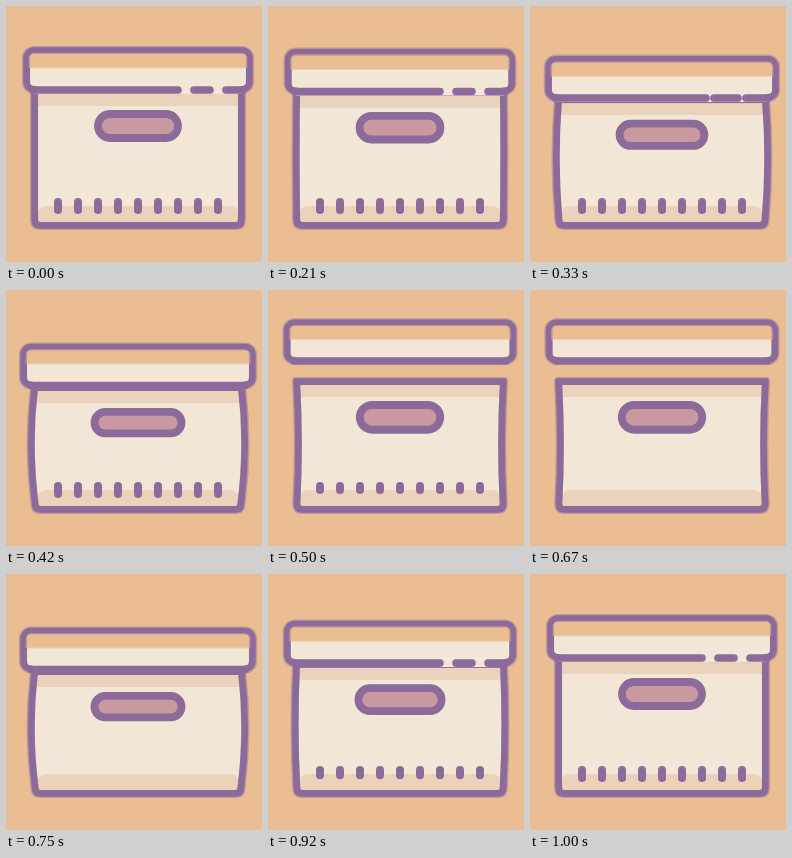
These frames come from a looping animation (256x256 px, 1210 ms). An HTML page with a canvas:

```html
<!DOCTYPE html>
<html lang="en">
<head>
<meta charset="utf-8">
<title>Storage box</title>
<style>
  html, body { margin: 0; width: 100%; height: 100%; overflow: hidden; background: #eabd93; }
  canvas { display: block; width: 256px; height: 256px; }
</style>
</head>
<body>
<canvas id="stage" width="256" height="256"></canvas>
<script>
const ctx = document.getElementById('stage').getContext('2d');
const LOOP = 1210, FPS = 24, AXIS = 132;
const ORANGE = '#eabd93', PURPLE = '#8c6a9a', CREAM = '#f2e7d7', SHADE = '#ead2bb', PINK = '#c899a0';

const rest   = { lidTop: 44, lidBase: 84, lidX: 20, boxTop: 84, bend: 28, foot: 28, gripY: 120, gripW: 80, gripH: 24 };
const squash = { lidTop: 56.5, lidBase: 95.5, lidX: 17, boxTop: 97, bend: 21, foot: 28.5, gripY: 132.7, gripW: 87, gripH: 21.5 };
const open   = { lidTop: 8, lidBase: 46.5, lidX: 20, boxTop: 85, bend: 42, foot: 28, gripY: 122, gripW: 74, gripH: 28 };

const clamp = x => Math.min(1, Math.max(0, x));
const ramp = (f, a, b) => clamp((f - a) / (b - a));
const smooth = x => x * x * (3 - 2 * x);
const soft = x => x + 0.4 * (smooth(x) - x);
const mirror = x => 2 * AXIS - x;

function mix(a, b, k) {
  const out = {};
  for (const key in a) out[key] = a[key] + (b[key] - a[key]) * k;
  return out;
}

function poseAt(f) {
  if (f < 10) return mix(rest, squash, soft(ramp(f, 4, 10)));
  if (f < 14) return mix(squash, open, smooth(ramp(f, 10, 14)));
  if (f < 18) return mix(open, squash, smooth(ramp(f, 14, 18)));
  return mix(squash, rest, ramp(f, 19, 24) ** 1.15);
}

function line(path, width, color = PURPLE, cap = 'round') {
  ctx.lineWidth = width;
  ctx.strokeStyle = color;
  ctx.lineCap = cap;
  ctx.stroke(path);
}

// Soft rim towards the backdrop, full weight inside the cream area
function outline(path, cream) {
  ctx.globalAlpha = 0.45;
  line(path, 8.2);
  ctx.globalAlpha = 1;
  line(path, 5.4);
  ctx.save();
  ctx.clip(cream);
  line(path, 8);
  ctx.restore();
}

function segment(x1, y1, x2, y2) {
  const p = new Path2D();
  p.moveTo(x1, y1);
  p.lineTo(x2, y2);
  return p;
}

function rounded(x, y, w, h, r) {
  const p = new Path2D();
  p.roundRect(x, y, w, h, r);
  return p;
}

function drawBox(p) {
  const body = new Path2D(), mid = (p.boxTop + 214) / 2;
  body.moveTo(28, p.boxTop);
  body.quadraticCurveTo(p.bend, mid, p.foot, 214);
  body.quadraticCurveTo(p.foot, 220, p.foot + 6, 220);
  body.lineTo(mirror(p.foot + 6), 220);
  body.quadraticCurveTo(mirror(p.foot), 220, mirror(p.foot), 214);
  body.quadraticCurveTo(mirror(p.bend), mid, mirror(28), p.boxTop);
  body.closePath();

  ctx.fillStyle = CREAM;
  ctx.fill(body);
  ctx.save();
  ctx.clip(body);
  ctx.fillStyle = SHADE;
  ctx.fillRect(0, p.boxTop, 256, 16);
  ctx.fill(rounded(30, 200, 204, 30, 10));
  ctx.restore();
  outline(body, body);

  const grip = rounded(AXIS - p.gripW / 2, p.gripY - p.gripH / 2, p.gripW, p.gripH, p.gripH / 2);
  ctx.fillStyle = PINK;
  ctx.fill(grip);
  line(grip, 7.8);
}

function drawTicks(f) {
  if (f > 14 && f < 20) return;
  const length = f <= 14 ? 1 - smooth(ramp(f, 10, 14)) : ramp(f, 20, 23);
  for (let x = 52; x <= 212; x += 20) line(segment(x, 196, x, 196.1 + 7.9 * length), 8);
}

function drawLid(p, gap) {
  const left = p.lidX, right = mirror(left), top = p.lidTop, base = p.lidBase;
  const split = top + 0.45 * (base - top);
  const fill = ctx.createLinearGradient(0, split - 1, 0, split + 1);
  fill.addColorStop(0, ORANGE);
  fill.addColorStop(1, CREAM);
  ctx.fillStyle = fill;
  ctx.fill(rounded(left, top, right - left, base - top, 8));
  if (gap > 0) line(segment(left + 8, base, right - 8, base), 8, CREAM, 'butt');

  const rim = new Path2D();
  rim.moveTo(left + 8, base);
  rim.arcTo(left, base, left, top, 8);
  rim.arcTo(left, top, right, top, 8);
  rim.arcTo(right, top, right, base, 8);
  rim.arcTo(right, base, left, base, 8);
  outline(rim, rounded(left, split, right - left, base - split, [0, 0, 8, 8]));

  const g = 8 * gap;
  const dashes = new Path2D();
  dashes.addPath(segment(left + 8, base, 180 - g, base));
  dashes.addPath(segment(180 + g, base, 212 - g, base));
  dashes.addPath(segment(212 + g, base, right - 8, base));
  line(dashes, 7.6);
}

function draw(now) {
  const f = Math.floor((now % LOOP + 5) * FPS / 1000);
  const pose = poseAt(f);
  const gap = f < 14 ? 1 - ramp(f, 6, 10) : ramp(f, 19, 22);
  ctx.fillStyle = ORANGE;
  ctx.fillRect(0, 0, 256, 256);
  ctx.lineJoin = 'round';
  drawBox(pose);
  drawTicks(f);
  drawLid(pose, gap);
}

const start = performance.now();
function loop() {
  draw(performance.now() - start);
  requestAnimationFrame(loop);
}
loop();
</script>
</body>
</html>
```
